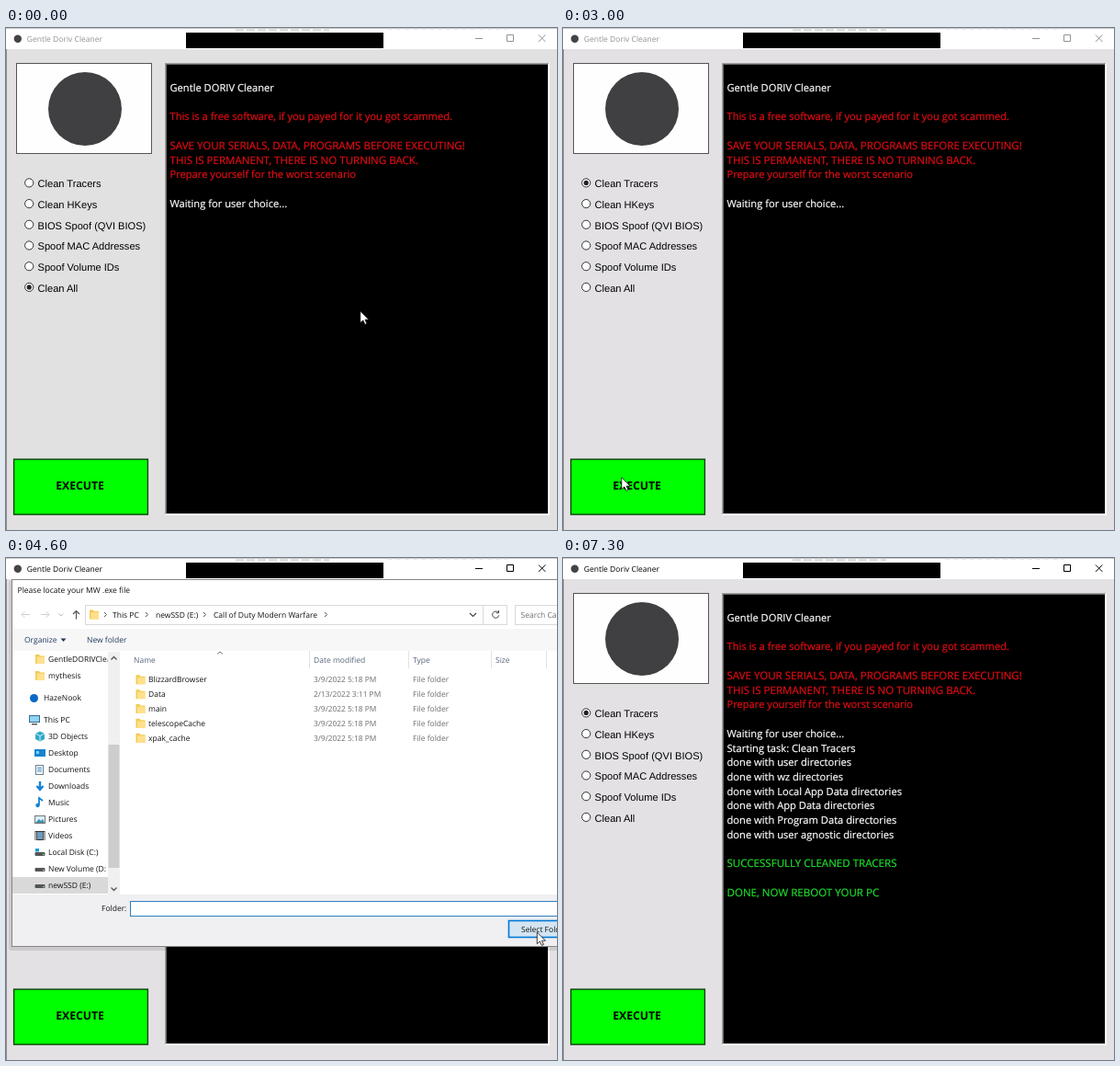
These frames come from a looping animation (600 by 546 pixels, 7400 ms). An HTML page:

```html
<!DOCTYPE html>
<html lang="en">
<head>
<meta charset="utf-8">
<title>Gentle Doriv Cleaner</title>
<style>
html, body { margin: 0; width: 100%; height: 100%; overflow: hidden; background: #e2e1e3; }
svg { display: block; width: 600px; height: 546px; }
text { font-family: "Open Sans", "Noto Sans", sans-serif; text-rendering: geometricPrecision; }
.radio text { font-family: "Liberation Sans", Arial, sans-serif; }
</style>
</head>
<body>
<svg id="stage" viewBox="0 0 600 546"></svg>
<script>
const LOOP = 7400;
const stage = document.getElementById('stage');

// Markup helpers
const text = (x, y, s, fill = '#111', size = 8.5, more = '') =>
  `<text x="${x}" y="${y}" fill="${fill}" font-size="${size}" ${more}>${s}</text>`;
const rect = (x, y, w, h, fill, more = '') =>
  `<rect x="${x}" y="${y}" width="${w}" height="${h}" fill="${fill}" ${more}/>`;
const box = (x, y, w, h, fill, stroke, more = '') =>
  rect(x + .5, y + .5, w - 1, h - 1, fill, `stroke="${stroke}" ${more}`);
const line = (d, stroke, width = 1, more = '') =>
  `<path d="${d}" fill="none" stroke="${stroke}" stroke-width="${width}" ${more}/>`;
const dot = (x, y, r, fill, more = '') =>
  `<circle cx="${x}" cy="${y}" r="${r}" fill="${fill}" ${more}/>`;
const group = (id, body, more = '') => `<g id="${id}" ${more}>${body}</g>`;
const folder = (x, y) =>
  `<path d="M${x} ${y - 5}h4l1 1.5h5v8.5h-10z" fill="#f3c951"/>` + rect(x + 1.5, y - 2.5, 8.5, 7.5, '#ffe08c');

// Console lines: row, colour, text, size
const CAPS = 11.55, BODY = 11.15, RED = '#e20d14', GREEN = '#1de02c';
const log = (row, fill, s, size = BODY) =>
  text(178.5, 69 + 15.73 * row, s, fill, size, `stroke="${fill}" stroke-width=".2"`);
const intro = [
  [0, '#fff', 'Gentle DORIV Cleaner'],
  [2, RED, 'This is a free software, if you payed for it you got scammed.'],
  [4, RED, 'SAVE YOUR SERIALS, DATA, PROGRAMS BEFORE EXECUTING!', CAPS],
  [5, RED, 'THIS IS PERMANENT, THERE IS NO TURNING BACK.', CAPS],
  [6, RED, 'Prepare yourself for the worst scenario'],
  [8, '#fff', 'Waiting for user choice...']
];
const report = [
  'Starting task: Clean Tracers',
  ...['user', 'wz', 'Local App Data', 'App Data', 'Program Data', 'user agnostic']
    .map(s => `done with ${s} directories`)
].map((s, i) => [9 + i, '#fff', s]).concat([
  [17, GREEN, 'SUCCESSFULLY CLEANED TRACERS', CAPS],
  [19, GREEN, 'DONE, NOW REBOOT YOUR PC', CAPS]
]);
const lines = list => list.map(l => log(...l)).join('');

const options = ['Clean Tracers', 'Clean HKeys', 'BIOS Spoof (QVI BIOS)',
  'Spoof MAC Addresses', 'Spoof Volume IDs', 'Clean All'];
const radioY = i => 168.4 + 22.7 * i;
const radios = options.map((s, i) =>
  dot(25.2, radioY(i), 4.6, '#fff', 'stroke="#333"') +
  text(34.5, radioY(i) + 4.8, s, '#000', 11.1)).join('');

const titleBar = rect(0, 0, 600, 23, '#fff') +
  line('M0 .5H600', '#c9c9c9') +
  line('M250 2.5H352', '#dfe4df', 3, 'stroke-dasharray="9 3"') +
  line('M416 1H545', '#d8d8d8', 1, 'stroke-dasharray="5 4"') +
  rect(196, 5, 215, 17, '#000') +
  dot(12.8, 11.8, 4.2, '#444') +
  group('caption', text(22.8, 15, 'Gentle Doriv Cleaner', 'currentColor', 8.5) +
    line('M511 11.5h8M545.5 7.5h7v7h-7zM580 7.5l7.4 7.4M587.4 7.5l-7.4 7.4', 'currentColor'));

const consolePane = rect(173, 38, 419, 492, '#fff') + rect(173, 38, 418, 491, '#a0a0a0') +
  rect(174, 39, 417, 490, '#e3e3e3') + rect(174, 39, 416, 489, '#696969') +
  rect(175, 40, 415, 488, '#000') +
  lines(intro) + group('report', lines(report));

const mainWindow = titleBar +
  group('client', rect(0, 23, 600, 523, 'currentColor')) +
  line('M.5 23V546', '#8c8c8c') +
  box(11, 38, 148, 99, '#fefefe', '#555') + dot(86, 88, 40, '#404043') +
  group('choices', radios + dot(25.2, 0, 2.6, '#222', 'id="mark"'), 'class="radio"') +
  rect(8.6, 469.1, 145.8, 60, '#0f0', 'stroke="#0b400b" stroke-width="1.4"') +
  text(80.6, 502.3, 'EXECUTE', '#000', 12.2, 'font-weight="700" text-anchor="middle"') +
  consolePane;

// Sidebar icons, centred near (37, y)
const drive = y => rect(31.5, y - 1, 11, 4, '#555', 'rx="1"') + rect(40, y + 1, 1.5, 1, '#8f8');
const icons = {
  '3D Objects': y => `<path d="M32 ${y - 3}l5-2.5 5 2.5v6l-5 2.5-5-2.5z" fill="#2ea8c8"/>` + line(`M32 ${y - 3}l5 2.5 5-2.5M37 ${y}v5`, '#d5f2fa'),
  'Desktop': y => rect(31, y - 4, 12, 8, '#1684d0') + rect(33, y - 2, 3, 3, '#7cd0ff'),
  'Documents': y => box(32, y - 5, 9, 11, '#fff', '#6b7f8e') + line(`M34 ${y - 2}h5M34 ${y}h5M34 ${y + 2}h5`, '#3a8fc4'),
  'Downloads': y => line(`M37 ${y - 5}v8M33.5 ${y}l3.5 4 3.5-4`, '#1782d2', 2.4),
  'Music': y => line(`M36 ${y + 3}v-8l4 3`, '#1782d2', 1.8) + dot(34.5, y + 3, 2.2, '#1782d2'),
  'Pictures': y => box(31, y - 4, 12, 9, '#d9effb', '#777') + `<path d="M32 ${y + 4}l4-4 2 2 2-2 2 4z" fill="#3f91ae"/>`,
  'Videos': y => rect(31.5, y - 5, 11, 10, '#333') + rect(34, y - 4, 6, 8, '#709bc0') + line(`M32.7 ${y - 4}v9M41.3 ${y - 4}v9`, '#ddd'),
  'Local Disk (C:)': y => drive(y + 1) + rect(32, y - 4, 4, 3.5, '#169bd7'),
  'New Volume (D:': drive,
  'newSSD (E:)': drive
};
const sidebar = rect(7, 347, 104, 18, '#d9d9d9') +
  folder(32, 110) + text(46, 113, 'GentleDORIVClea', '#111', 8.5, 'clip-path="url(#side)"') +
  folder(32, 128) + text(46, 131.2, 'mythesis') +
  dot(30.5, 152.5, 4.5, '#0a68c4') + text(41, 155.2, 'HazeNook') +
  box(25, 171, 12, 8, '#8fd4f7', '#376a8c') + rect(28, 180, 6, 1.5, '#555') + text(41, 179.2, 'This PC') +
  Object.keys(icons).map((s, i) => icons[s](194 + 18 * i) +
    text(46, 197.2 + 18 * i, s, '#111', 8.5, 'clip-path="url(#side)"')).join('');

const rows = ['BlizzardBrowser', 'Data', 'main', 'telescopeCache', 'xpak_cache'].map((s, i) => {
  const y = 132.3 + 15.85 * i;
  return folder(141.5, y) + text(155, y + 3.1, s) +
    text(335, y + 3.1, i == 1 ? '2/13/2022 3:11 PM' : '3/9/2022 5:18 PM', '#6d6d6d', 8.4) +
    text(443, y + 3.1, 'File folder', '#6d6d6d');
}).join('');
const heads = [[139, 'Name'], [335, 'Date modified'], [443, 'Type'], [533, 'Size']]
  .map(([x, s]) => text(x, 114, s, '#56657a')).join('');

const address = box(86, 51, 434, 22, '#fff', '#d9d9d9') + box(519, 51, 27, 22, '#fff', '#d9d9d9') +
  box(554, 51, 60, 22, '#fff', '#d9d9d9') +
  line('M26 61.5h-9m3.5-3.5l-3.5 3.5 3.5 3.5M38 61.5h9m-3.5-3.5l3.5 3.5-3.5 3.5', '#d0d0d0') +
  line('M57.5 60.5l2.5 2.5 2.5-2.5', '#bbb') +
  line('M76.5 66.5v-9m-3.5 3.5l3.5-3.5 3.5 3.5', '#555', 1.2) +
  folder(91, 61.5) +
  [107, 152, 215, 347].map(x => line(`M${x} 59l2.5 2.5-2.5 2.5`, '#555')).join('') +
  text(116, 64.8, 'This PC') + text(163, 64.8, 'newSSD (E:)') +
  text(226, 64.8, 'Call of Duty Modern Warfare') + text(560.5, 64.8, 'Search Ca', '#6d6d6d') +
  line('M505 60l3.5 3.5 3.5-3.5', '#444', 1.2) +
  line('M536 59.3a3.6 3.6 0 1 0 .8 3M536.5 57v2.8h-2.8', '#444');

const content = address +
  rect(7, 77, 600, 24, '#f7f7f8') + text(20, 92.2, 'Organize', '#1e395b') +
  '<path d="M59.5 87.5h6l-3 3.5z" fill="#1e395b"/>' + text(88, 92.2, 'New folder', '#1e395b') +
  line('M230 104.5l3-2.5 3 2.5', '#777') + heads +
  line('M330.5 101v19M438.5 101v19M528.5 101v19M588.5 101v19', '#e2e2e2') +
  sidebar + rows + text(104, 384.4, 'Folder:') + text(561, 406.5, 'Select Folder');

const dialog = rect(3, 24, 610, 403, '#000', 'opacity=".1" rx="3"') +
  box(6, 23, 620, 400, '#fff', '#858585') +
  rect(7, 366, 600, 56, '#f0eff1') +
  dot(18, 35, 4.2, '#444', 'id="dlgIcon"') +
  text(28, 38, 'Please locate your MW .exe file', '#111', 8.55, 'id="dlgTitle"') +
  rect(111, 102, 13, 264, '#f0f0f0') + rect(111.5, 203, 12, 134, '#cdcdcd') +
  line('M114.5 110.5l3-3 3 3M114.5 358.5l3 3 3-3', '#555', 1.3) +
  box(135, 373, 480, 17, '#fff', '#2f7fc1') +
  box(547, 394, 70, 19, '#e1e1e1', '#0078d7', 'id="select" stroke-width="1.6"') +
  group('content', content) + rect(139.5, 375.5, 1, 11, '#000', 'id="caret"');

stage.innerHTML = '<clipPath id="side"><rect x="7" y="100" width="103.5" height="266"/></clipPath>' +
  mainWindow + group('dialog', dialog) +
  group('cursor', '<path d="M-.2 0V12.6L2.9 10 4.9 14.4 6.9 13.5 5 9.2H9Z" fill="#fff" stroke="#111" stroke-width=".8"/>');

// Pointer stops: time, x, y
const stops = [
  [0, 386, 308], [800, 111, 464], [1600, 24, 169], [2000, 24, 169], [2200, 41, 393],
  [2800, 64, 489], [3300, 64, 489], [3500, 370, 362], [3900, 372, 362], [4500, 579, 407],
  [4800, 577, 407], [5300, 577, 413], [6100, 470, 308], [6700, 602, -20], [LOOP, 602, -20]
];
function pointer(t) {
  const i = stops.findIndex(s => s[0] > t);
  const [t0, x0, y0] = stops[i - 1], [t1, x1, y1] = stops[i];
  const u = (t - t0) / (t1 - t0), k = u * u * (3 - 2 * u);
  return [x0 + (x1 - x0) * k, y0 + (y1 - y0) * k];
}

const $ = id => document.getElementById(id);
const show = (id, on) => $(id).setAttribute('visibility', on ? 'inherit' : 'hidden');

function draw(t) {
  const open = t >= 3300 && t < 4800, closing = t >= 4600;
  const active = t >= 1700 && t < 2900 || closing;
  $('caption').setAttribute('color', active ? '#000' : '#929292');
  $('client').setAttribute('color', t < 1700 ? '#e1e1e1' : '#e3e1e4');
  $('mark').setAttribute('cy', radioY(t < 1700 ? 5 : 0));
  show('report', t >= 4700);

  // Dialog grows and fades in, then shrinks and fades out
  const fade = t < 3400 ? .42 : t < 3500 ? .9 : t < 4700 ? 1 : .4;
  const k = (1 - fade) / .58;
  $('dialog').setAttribute('visibility', open ? 'visible' : 'hidden');
  $('dialog').setAttribute('opacity', fade);
  $('dialog').setAttribute('transform',
    `translate(${10.2 * k} ${5.7 * k}) scale(${1 - .03 * k})`);
  show('content', t >= 3400);
  show('dlgIcon', !closing);
  $('dlgTitle').setAttribute('x', closing ? 12.5 : 28);
  show('caret', t >= 3400 && !closing && (t - 3400) % 1060 < 530);

  const [x, y] = pointer(t);
  $('select').setAttribute('fill', x > 547 && y > 394 ? '#d3e4f3' : '#e1e1e1');
  $('cursor').setAttribute('transform', `translate(${x} ${y})`);
}

const start = performance.now();
function frame(now) {
  const t = Math.max(0, now - start) % LOOP;
  draw(Math.floor(t / 100) * 100);
  requestAnimationFrame(frame);
}
draw(0);
requestAnimationFrame(frame);
</script>
</body>
</html>
```
